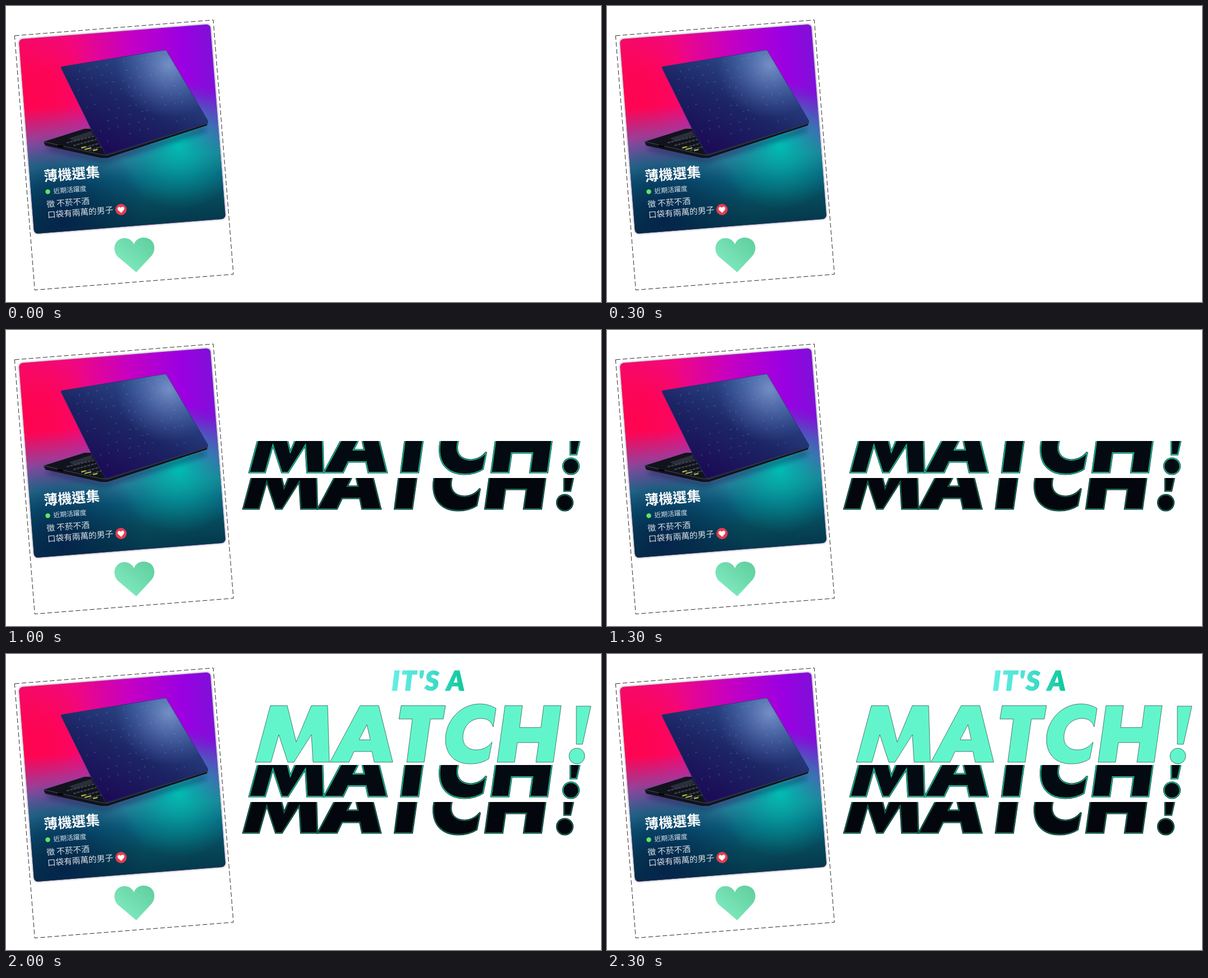
Write an HTML page that moves like this. It is 1060x528 px and loops after 2500 ms.

```html
<!DOCTYPE html>
<html lang="zh-Hant">
<head>
<meta charset="utf-8">
<title>It's a match!</title>
<style>
  html, body { margin: 0; width: 100%; height: 100%; overflow: hidden; background: #fff; }
  svg { display: block; width: 1060px; height: 528px; }
  .cjk { font-family: "Noto Sans CJK TC", "Noto Sans CJK", sans-serif; fill: #fff; font-weight: 300; }
  .name { font-size: 25px; font-weight: 700; }
  .status { font-size: 11.8px; fill-opacity: .85; }
  .bio { font-size: 14.7px; fill-opacity: .85; }
  .intro { font: italic 900 48px Lato, sans-serif; letter-spacing: 2.6px; }

  .step { opacity: 0; animation: 2500ms step-end infinite; }
  .low { animation-name: low; }
  .mid { animation-name: mid; }
  .top { animation-name: top; }
  .intro { animation-name: intro; }
  @keyframes low { 0% { opacity: 0 } 20%, 100% { opacity: 1 } }
  @keyframes mid { 0% { opacity: 0 } 40%, 100% { opacity: 1 } }
  @keyframes top { 0% { opacity: 0 } 60%, 100% { opacity: 1 } }
  @keyframes intro { 0% { opacity: 0 } 80%, 100% { opacity: 1 } }
</style>
</head>
<body>
<svg viewBox="0 0 1060 528">
  <defs>
    <linearGradient id="sky">
      <stop offset="0" stop-color="#f40a6c"/>
      <stop offset=".28" stop-color="#f2087e"/>
      <stop offset=".58" stop-color="#c400c4"/>
      <stop offset=".85" stop-color="#9a00e2"/>
      <stop offset="1" stop-color="#8010d8"/>
    </linearGradient>
    <linearGradient id="sea" x2="0" y2="1">
      <stop offset=".36" stop-color="#6858c8" stop-opacity="0"/>
      <stop offset=".55" stop-color="#5866b4" stop-opacity=".75"/>
      <stop offset=".66" stop-color="#2a7898"/>
      <stop offset=".76" stop-color="#0a607e"/>
      <stop offset=".88" stop-color="#064a5c"/>
      <stop offset="1" stop-color="#05394c"/>
    </linearGradient>
    <radialGradient id="red" gradientUnits="userSpaceOnUse" cx="25" cy="110" r="120">
      <stop offset="0" stop-color="#ff0450"/>
      <stop offset=".4" stop-color="#ff0450" stop-opacity=".8"/>
      <stop offset="1" stop-color="#ff0450" stop-opacity="0"/>
    </radialGradient>
    <radialGradient id="teal" gradientUnits="userSpaceOnUse" cx="276" cy="218" r="115">
      <stop offset="0" stop-color="#00bdb2"/>
      <stop offset=".3" stop-color="#00b0a8" stop-opacity=".75"/>
      <stop offset="1" stop-color="#009890" stop-opacity="0"/>
    </radialGradient>
    <radialGradient id="deep" gradientUnits="userSpaceOnUse" cx="60" cy="330" r="150">
      <stop offset="0" stop-color="#041f48" stop-opacity=".85"/>
      <stop offset="1" stop-color="#041f48" stop-opacity="0"/>
    </radialGradient>
    <linearGradient id="lid" gradientUnits="userSpaceOnUse" x1="180" y1="255" x2="262" y2="85">
      <stop offset="0" stop-color="#1b0b56"/>
      <stop offset=".45" stop-color="#1c2464"/>
      <stop offset="1" stop-color="#2f5090"/>
    </linearGradient>
    <radialGradient id="shine" gradientUnits="userSpaceOnUse" cx="290" cy="105" r="95">
      <stop offset="0" stop-color="#93aadd" stop-opacity=".7"/>
      <stop offset="1" stop-color="#5c80c8" stop-opacity="0"/>
    </radialGradient>
    <linearGradient id="mint" x1="0" y1="1" x2="1" y2="0">
      <stop offset="0" stop-color="#86efc6"/>
      <stop offset="1" stop-color="#5ecd9b"/>
    </linearGradient>
    <linearGradient id="lead" gradientUnits="userSpaceOnUse" x1="687" y1="0" x2="820" y2="0">
      <stop offset="0" stop-color="#62f0e4"/>
      <stop offset=".5" stop-color="#48dfd0"/>
      <stop offset="1" stop-color="#0bc698"/>
    </linearGradient>
    <filter id="soft" x="-10%" y="-30%" width="120%" height="160%"><feGaussianBlur stdDeviation="5"/></filter>
    <filter id="halo"><feGaussianBlur stdDeviation="1.6"/></filter>

    <rect id="pane" x="7" y="7" width="342" height="348" rx="7"/>
    <path id="cover" d="M98 110Q98 108 101 108L281 79Q285 78 287 82L359 204Q361 208 357 209L178 265 152 220Z"/>
    <g id="word">
      <path d="M444 193 471 92H501L517 157 544 92H573L576 193H547L544 144 513 193H502L486 144 472 193Z"/>
      <path fill-rule="evenodd" d="M577 193 631 92H664L689 193H656L652 174H620L611 193ZM643 126 629 153H649Z"/>
      <path d="M704 92H783L779 116H756L745 193H714L724 116H700Z"/>
      <path d="M873 97C863 91 853 89 844 89C811 89 783 118 783 152C783 180 800 196 827 196C840 196 851 193 860 187L866 157C858 167 849 171 838 171C823 171 814 162 814 149C814 130 827 115 846 115C857 115 864 119 868 130Z"/>
      <path d="M889 92H920L915 131H953L958 92H989L975 193H944L949 158H911L906 193H875Z"/>
      <path d="M1016 93H1042L1027 161H1016Z"/>
      <circle cx="1017" cy="182" r="14"/>
    </g>
    <clipPath id="lowCut"><rect x="410" y="264" width="650" height="70"/></clipPath>
    <clipPath id="midCut"><rect x="410" y="198" width="650" height="64"/></clipPath>
  </defs>

  <g transform="translate(15.3 53) rotate(-4.53)">
    <rect width="355" height="455" fill="#fff" stroke="#000" stroke-width=".8" stroke-dasharray="8.4 4.2"/>
    <rect x="6" y="6" width="344" height="350" rx="8" fill="#aab" filter="url(#halo)"/>
    <use href="#pane" fill="url(#sky)"/>
    <use href="#pane" fill="url(#red)"/>
    <use href="#pane" fill="url(#sea)"/>
    <use href="#pane" fill="url(#teal)"/>
    <use href="#pane" fill="url(#deep)"/>
    <g class="cjk">
      <text class="name" x="32" y="263">薄機選集</text>
      <circle cx="37" cy="282" r="4.3" fill="#5fe85c"/>
      <text class="status" x="47" y="286">近期活躍度</text>
      <text class="bio" x="33" y="309.5">徵 不菸不酒</text>
      <text class="bio" x="33" y="328.6">口袋有兩萬的男子</text>
    </g>
    <circle cx="164.5" cy="324" r="10" fill="#e63c50"/>
    <path transform="translate(164.5 324)" fill="#fff" d="M0 6 -5 1C-8 -3 -3 -7 0 -3C3 -7 8 -3 5 1Z"/>
  </g>

  <g stroke-linejoin="round">
    <path d="M75 252 175 276 355 220" fill="none" stroke="#0a1440" stroke-width="7" opacity=".5" filter="url(#soft)"/>
    <path d="M67 242 140 219 153 219 182 262 360 205 358 213 181 271 169 271 70 249Z" fill="#11131c"/>
    <path d="M67 242 169 265 181 266 360 209" fill="none" stroke="#454a58"/>
    <path d="M112 236 152 223 155 230 122 241Z" fill="#2b2f3c"/>
    <path d="M108 244 157 232M120 249 161 238M134 254 166 245M148 258 170 251" stroke="#3c414c" stroke-width="2.5" stroke-dasharray="5 1.5"/>
    <path d="M134 253 142 251M140 256 152 253M155 258 163 256" stroke="#b5c43a" stroke-width="2"/>
    <path d="M92 249 102 251" stroke="#000" stroke-width="3"/>
    <use href="#cover" fill="url(#lid)" stroke="#22306c"/>
    <use href="#cover" fill="url(#shine)"/>
    <path id="ticks" fill="none" stroke="#7ea4e4" opacity=".38"/>
  </g>

  <path d="M232 475 199 447C191 439 191 424 201 417C210 411 223 414 228 425C232 413 246 410 256 416C266 422 267 437 259 446Z" fill="url(#mint)"/>

  <g class="step low" clip-path="url(#lowCut)"><g transform="translate(-21.5 126)" fill="#03060c">
    <use href="#word" stroke="#000" stroke-width="3"/>
    <use href="#word" stroke="#0b6a56" stroke-width="1.8"/>
  </g></g>
  <g class="step mid" clip-path="url(#midCut)"><g transform="translate(-10.5 61)" fill="#040a12">
    <use href="#word" stroke="#000" stroke-width="3"/>
    <use href="#word" stroke="#12b48e" stroke-width="2"/>
  </g></g>
  <use class="step top" href="#word" fill="#62f5cb" stroke="#0c2a24" stroke-width=".6"/>
  <text class="step intro" x="687" y="65" fill="url(#lead)" stroke="url(#lead)" stroke-width="1.4">IT'S A</text>
</svg>
<script>
  // Scattered short strokes laid over the slanted lid.
  let seed = 7;
  const rand = () => (seed = seed * 16807 % 2147483647) / 2147483647;
  const mix = (a, b, t) => a + (b - a) * t;
  const onLid = (u, v) => [
    mix(mix(98, 285, u), mix(176, 360, u), v),
    mix(mix(110, 79, u), mix(266, 208, u), v)
  ];
  let d = "";
  for (let row = 0; row < 9; row++) {
    for (let col = 0; col < 11; col++) {
      if (rand() < .25) continue;
      const [x, y] = onLid((col + .7 + rand() * .3) / 12, (row + .6) / 10);
      const turn = rand() * 2 * Math.PI;
      d += `M${x.toFixed(1)} ${y.toFixed(1)}l${(4 * Math.cos(turn)).toFixed(1)} ${(4 * Math.sin(turn)).toFixed(1)}`;
    }
  }
  document.getElementById("ticks").setAttribute("d", d);
</script>
</body>
</html>
```
